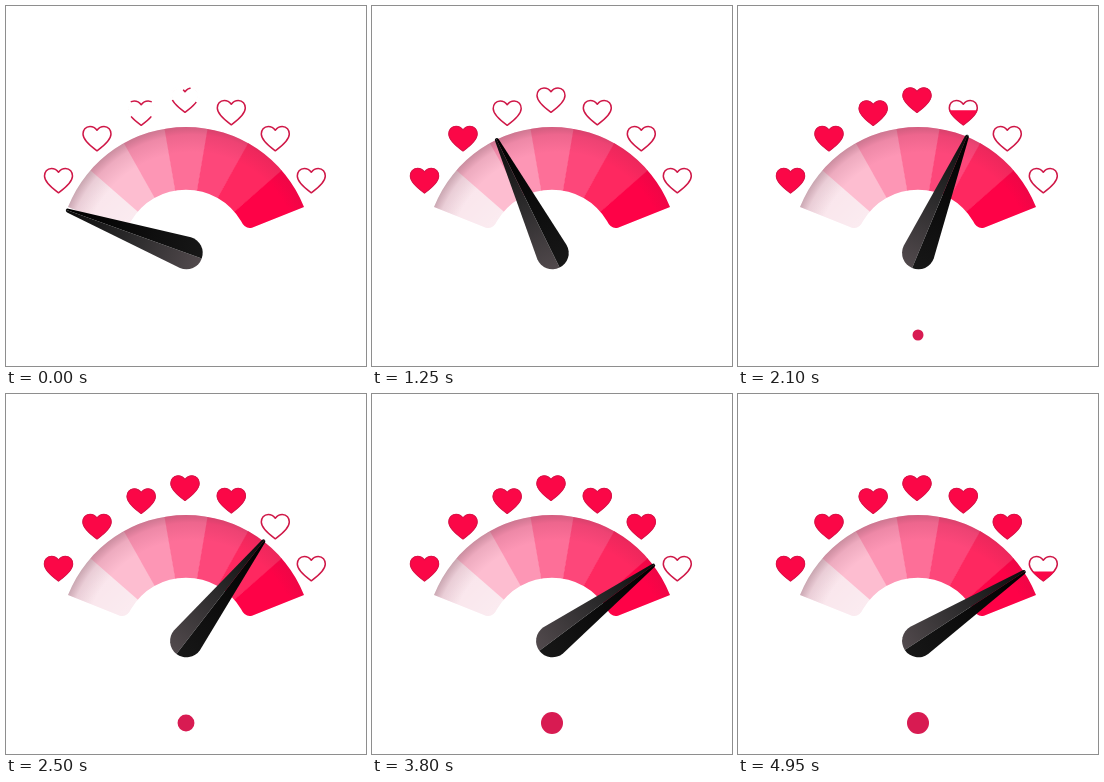
These frames come from a looping animation (360 px wide and 360 px high, 5000 ms). An HTML page:

```html
<!DOCTYPE html>
<html lang="en">
<head>
<meta charset="utf-8">
<title>Love meter</title>
<style>
  html, body { margin: 0; width: 100%; height: 100%; overflow: hidden; background: #fff; }
  svg { display: block; width: 100vw; height: 100vh; }
  .outline { fill: none; stroke: #cf1747; stroke-width: 1.5; stroke-linejoin: round; }
  .gap { fill: none; stroke: #fff; stroke-width: 3; }
  .fill { fill: #fb0747; stroke: #e30f48; stroke-width: 1; }
</style>
</head>
<body>
<svg viewBox="0 0 360 360">
  <defs>
    <path id="heart" pathLength="100" d="M0-8.3C2-11 4.5-12 7-12C11.5-12 14-8.5 14-4.5C14 1.5 6 8 0 12.3C-6 8-14 1.5-14-4.5C-14-8.5-11.5-12-7-12C-4.5-12-2-11 0-8.3Z"/>
    <clipPath id="dial">
      <path d="M62 201A127 127 0 0 1 298 201L246 221.7Q239 223.5 235 215A64 64 0 0 0 125 215Q121 223.5 114 221.7Z"/>
    </clipPath>
    <radialGradient id="shade" gradientUnits="userSpaceOnUse" cx="186" cy="255" r="136">
      <stop offset=".8" stop-color="#7a2440" stop-opacity="0"/>
      <stop offset=".93" stop-color="#7a2440" stop-opacity=".12"/>
      <stop offset="1" stop-color="#7a4454" stop-opacity=".38"/>
    </radialGradient>
    <linearGradient id="pale" gradientUnits="userSpaceOnUse" x1="75" y1="175" x2="120" y2="222">
      <stop offset="0" stop-color="#fff" stop-opacity="0"/>
      <stop offset="1" stop-color="#fff" stop-opacity=".3"/>
    </linearGradient>
    <linearGradient id="metal" gradientUnits="userSpaceOnUse" x1="0" y1="-127" x2="0" y2="17">
      <stop offset="0" stop-color="#0c0c0c"/>
      <stop offset=".5" stop-color="#2c2b2c"/>
      <stop offset="1" stop-color="#524a4d"/>
    </linearGradient>
    <linearGradient id="dark" gradientUnits="userSpaceOnUse" x1="0" y1="-127" x2="0" y2="17">
      <stop offset="0" stop-color="#000"/>
      <stop offset="1" stop-color="#171717"/>
    </linearGradient>
  </defs>
  <g id="hearts"></g>
  <g clip-path="url(#dial)">
    <g id="wedges"></g>
    <path d="M180 248L40 195V140H84.5V164Z" fill="url(#pale)"/>
    <rect x="50" y="110" width="260" height="120" fill="url(#shade)"/>
  </g>
  <g id="needle">
    <path d="M0-128Q-1.6-128-2-126L-16.3-1A16.3 16.3 0 0 0 0 16.3Z" fill="url(#metal)"/>
    <path d="M0-128Q1.6-128 2-126L16.3-1A16.3 16.3 0 0 1 0 16.3Z" fill="url(#dark)"/>
  </g>
  <circle id="dot" cx="180" cy="329" fill="#d81b52"/>
</svg>
<script>
const LOOP = 5000, STEP = 50;
const $ = id => document.getElementById(id);

function add(parent, tag, attrs) {
  const el = document.createElementNS('http://www.w3.org/2000/svg', tag);
  for (const k in attrs) el.setAttribute(k, attrs[k]);
  return parent.appendChild(el);
}

// Dial wedges, left to right
const colors = ['#f9e3ea', '#fdbdd0', '#fd96b5', '#fd6f98', '#fd477a', '#fe2860', '#fe0247'];
const EDGE = 21.7, SWEEP = (180 - 2 * EDGE) / 7;
const rim = deg => {
  const a = deg * Math.PI / 180;
  return `${180 - 150 * Math.cos(a)} ${248 - 150 * Math.sin(a)}`;
};
colors.forEach((fill, i) => {
  const from = i ? EDGE + i * SWEEP : EDGE - 4;
  const to = EDGE + (i + 1) * SWEEP + (i < 6 ? 0.3 : 4);
  add($('wedges'), 'path', { d: `M180 248L${rim(from)}L${rim(to)}Z`, fill });
});

// Hearts: x, y, needle angle at which filling starts
const FILL_SPAN = 8;
const hearts = [
  [52.5, 174.5, 24], [91, 132.5, 46], [135.2, 107, 67], [179, 94, 88],
  [225.3, 106.5, 108], [269.3, 132.5, 129.5], [305.3, 174.5, 143.7]
].map(([x, y, start], i) => {
  const g = add($('hearts'), 'g', { transform: `translate(${x} ${y})` });
  add(g, 'use', { href: '#heart', class: 'outline' });
  const gaps = add(g, 'g', {});
  const clip = add(g, 'clipPath', { id: 'level' + i });
  const level = add(clip, 'rect', { x: -16, width: 32, height: 40 });
  const wrap = add(g, 'g', { 'clip-path': `url(#level${i})` });
  add(wrap, 'use', { href: '#heart', class: 'fill' });
  return { start, level, gaps };
});

// Breaks in the outlines: heart, place on path, then time/length pairs
const gaps = [
  [2, 24, 0, 20, 800, 46, 1150, 0], [2, 76, 0, 20, 800, 46, 1150, 0],
  [3, 20, 0, 24, 700, 0], [3, 84, 0, 26, 900, 0],
  [4, 88, 500, 0, 750, 9, 1100, 0], [4, 62, 500, 0, 750, 10, 1100, 0],
  [6, 64, 1400, 0, 1700, 9, 2100, 0], [6, 78, 1400, 0, 1700, 6, 2100, 0]
].map(([i, at, ...keys]) => ({
  at, keys,
  el: add(hearts[i].gaps, 'path', { class: 'gap', pathLength: 100, d: $('heart').getAttribute('d') })
}));

function gapLength(keys, t) {
  for (let i = 0; i + 3 < keys.length; i += 2) {
    const [t0, a, t1, b] = keys.slice(i, i + 4);
    if (t >= t0 && t < t1) return a + (b - a) * (t - t0) / (t1 - t0);
  }
  return 0;
}

// Needle: seconds, degrees, degrees per second
const swing = [
  [0, 19.7, 2], [.75, 35.7, 44], [1.7, 91.8, 57], [2.5, 127.7, 28],
  [3, 136.9, 12], [3.8, 143.2, 5], [5, 146.9, 1.5]
];

function needleAngle(s) {
  const i = swing.findIndex(k => k[0] > s);
  const [t0, a, va] = swing[i - 1], [t1, b, vb] = swing[i];
  const d = t1 - t0, u = (s - t0) / d, w = 1 - u;
  return w * w * ((1 + 2 * u) * a + u * d * va) + u * u * ((3 - 2 * u) * b - w * d * vb);
}

const clamp = v => Math.max(0, Math.min(1, v));

function draw(t) {
  const angle = needleAngle(t / 1000);
  $('needle').setAttribute('transform', `translate(180.4 247) rotate(${angle - 90})`);
  for (const { start, level } of hearts) {
    const p = clamp((angle - start) / FILL_SPAN);
    level.setAttribute('y', 13.5 - 27 * p);
  }
  for (const { at, keys, el } of gaps) {
    const len = gapLength(keys, t);
    el.style.display = len ? '' : 'none';
    el.setAttribute('stroke-dasharray', `${len} 100`);
    el.setAttribute('stroke-dashoffset', len / 2 - at);
  }
  $('dot').setAttribute('r', 11 * clamp((t - 1350) / 1500));
}

const begin = performance.now();
function tick() {
  const t = (performance.now() - begin) % LOOP;
  draw(Math.floor(t / STEP) * STEP);
  requestAnimationFrame(tick);
}
tick();
</script>
</body>
</html>
```
